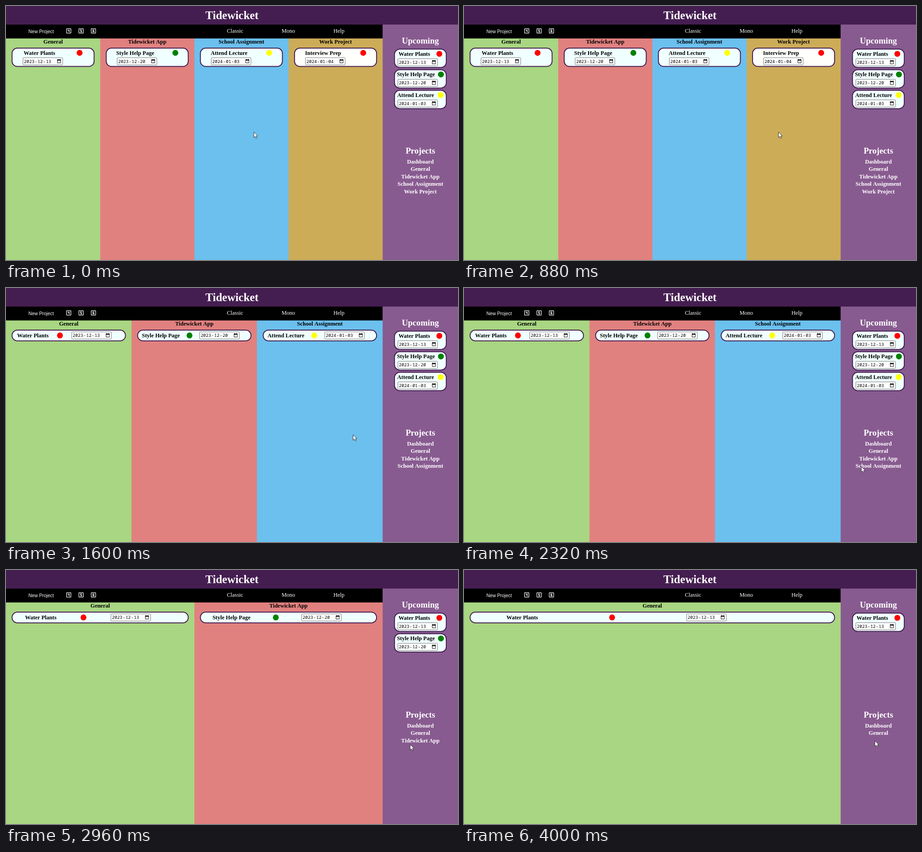
Recreate the animation shown at these times as an HTML page with a canvas. Size 998 by 561 pixels, loop 4080 ms.

```html
<!DOCTYPE html>
<html lang="en">
<head>
<meta charset="utf-8">
<title>Task board</title>
<style>
html, body { margin: 0; width: 100%; height: 100%; overflow: hidden; background: #000; }
canvas { display: block; width: 998px; height: 561px; }
</style>
</head>
<body>
<canvas id="stage" width="998" height="561"></canvas>
<script>
const ctx = document.getElementById('stage').getContext('2d');
const LOOP = 4080, STEP = 80;
const PURPLE = '#451e51';
const SERIF = '"Liberation Serif", "Times New Roman", serif';
const BOLD = 'bold 12.47px ' + SERIF;
const HEAD = 'bold 18.7px ' + SERIF;
const MONO = '9.53px "Noto Sans Mono", monospace';
const BAR_W = 831.6;
const DOT = 13, DATE_W = 88.5;

const projects = [
  { name: 'General', bg: '#a8d682', task: 'Water Plants', dot: '#ff0000', date: '2023-12-13' },
  { name: 'Tidewicket App', bg: '#e1817f', task: 'Style Help Page', dot: '#008000', date: '2023-12-20' },
  { name: 'School Assignment', bg: '#6bc0ee', task: 'Attend Lecture', dot: '#ffff00', date: '2024-01-03' },
  { name: 'Work Project', bg: '#cdac58', task: 'Interview Prep', dot: '#ff0000', date: '2024-01-04', fill: '#fffffc' }
];
const removals = [960, 2800, 3920];

// time, x, y of the pointer tip
const pointer = [
  [80, 547, 278], [800, 694, 278], [1120, 694, 278], [2240, 877, 394],
  [2320, 877, 394], [2640, 892, 389], [2800, 892, 389], [2960, 892, 385],
  [3600, 911, 377], [3840, 911, 377], [4000, 907, 377]
];
const handTimes = [[2400, 2800], [3360, 3920]];

const ARROW = new Path2D('M0 0V12.4L2.8 9.7L4.7 14L6.7 13.1L4.9 8.9H8.6Z');
const HAND = new Path2D('M-1.2 8V.9Q-1.2-.4 0-.4Q1.2-.4 1.2.9V5Q2.6 4.3 3.3 5.4Q4.7 4.8 5.2 6Q6.9 5.7 6.9 7.5V10.3Q6.9 12.3 5.6 13.4V15H-1.2V13.6L-4 9.2Q-4.6 7.9-3.5 7.5Q-2.6 7.2-1.2 9Z');
const DIGITS = {
  4: new Path2D('M10 7v5h4M14 7v10'),
  5: new Path2D('M15 8h-5v4h4v4h-5'),
  6: new Path2D('M15 8h-5v8h4v-4h-4')
};

function rect(x, y, w, h, color) {
  ctx.fillStyle = color;
  ctx.fillRect(x, y, w, h);
}

function text(str, x, y, font, color, align = 'left') {
  ctx.font = font;
  ctx.fillStyle = color;
  ctx.textAlign = align;
  ctx.fillText(str, x, y);
}

function dateField(x, cy, date) {
  ctx.beginPath();
  ctx.roundRect(x + .5, cy - 7.9, DATE_W - 1, 15.8, 1.3);
  ctx.fillStyle = '#fff';
  ctx.fill();
  ctx.strokeStyle = '#767676';
  ctx.lineWidth = 1;
  ctx.stroke();

  let tx = x + 2.1;
  date.split('-').forEach((part, i) => {
    if (i) {
      text('-', tx, cy + 3.4, MONO, '#000');
      tx += 5.72;
    }
    text(part, tx + .65, cy + 3.4, MONO, '#000');
    tx += part.length * 5.72 + 1.3;
  });

  const ix = x + 76;
  ctx.strokeStyle = '#111';
  ctx.strokeRect(ix + .5, cy - 3.5, 7, 7);
  rect(ix, cy - 4, 8, 2.4, '#111');
  rect(ix + 1, cy - 5, 1.2, 1.2, '#111');
  rect(ix + 5.8, cy - 5, 1.2, 1.2, '#111');
}

// Items share the free width evenly; narrow cards wrap the date to a second row.
function card(p, x, y, w, wrap) {
  const h = wrap ? 42.4 : 25.6;
  ctx.beginPath();
  ctx.roundRect(x + 1, y + 1, w - 2, h - 2, wrap ? 11.5 : 11.8);
  ctx.fillStyle = p.fill || '#f0ffff';
  ctx.fill();
  ctx.strokeStyle = PURPLE;
  ctx.lineWidth = 2;
  ctx.stroke();

  ctx.font = BOLD;
  const tw = ctx.measureText(p.task).width;
  const inner = w - 4, left = x + 2;
  const used = tw + DOT + (wrap ? 0 : DATE_W);
  const gap = (inner - used) / (wrap ? 4 : 8);
  const cy = y + (wrap ? 11.4 : 12.7);
  const dotX = left + gap * 3 + tw;

  text(p.task, left + gap + .5, cy + 4.1, BOLD, '#000');
  ctx.beginPath();
  ctx.arc(dotX + DOT / 2 - .4, cy, DOT / 2, 0, Math.PI * 2);
  ctx.fillStyle = p.dot;
  ctx.fill();

  if (wrap) dateField(left + (inner - DATE_W) / 4, y + 30, p.date);
  else dateField(dotX + DOT + gap * 2 - .7, cy, p.date);
}

function digitIcon(n, cx) {
  ctx.save();
  ctx.translate(cx, 55);
  ctx.scale(.61, .61);
  ctx.translate(-12, -12);
  ctx.strokeStyle = '#fff';
  ctx.lineWidth = 2;
  ctx.beginPath();
  ctx.roundRect(4, 4, 16, 16, 1.2);
  ctx.stroke();
  ctx.stroke(DIGITS[n]);
  ctx.restore();
}

function navBar() {
  rect(0, 41, BAR_W, 30.5, '#000');
  text('New Project', 49.5, 59.6, '10.4px "Liberation Sans", Arial, sans-serif', '#fff');
  [4, 5, 6].forEach((n, i) => digitIcon(n, 138.5 + i * 27.3));
  const font = '12.47px ' + SERIF;
  text('Classic', 505.8, 58.5, font, '#fff', 'center');
  text('Mono', 623.4, 58.5, font, '#fff', 'center');
  text('Help', 735, 58.5, font, '#fff', 'center');
}

function columns(list) {
  const w = BAR_W / list.length;
  list.forEach((p, i) => {
    const x = i * w, edge = Math.round(x);
    rect(edge, 71.5, Math.round(x + w) - edge, 490, p.bg);
    text(p.name, x + w / 2, 82.9, BOLD, '#000', 'center');
    card(p, x + 12.4, 92.1, w - 24.8, list.length > 3);
  });
}

function sidebar(list) {
  const cx = 914.9;
  rect(BAR_W, 41, 998 - BAR_W, 520, '#885b90');
  text('Upcoming', cx, 83.2, HEAD, '#fff', 'center');
  list.slice(0, 3).forEach((p, i) => card(p, 856.8, 94.3 + i * 45.5, 116.3, true));
  text('Projects', cx, 326, HEAD, '#fff', 'center');
  ['Dashboard', ...list.map(p => p.name)].forEach((name, i) =>
    text(name, cx, 347.5 + i * 16.5, BOLD, '#fff', 'center'));
}

function pointerAt(t) {
  if (t <= pointer[0][0]) return pointer[0].slice(1);
  const i = pointer.findIndex(k => k[0] >= t);
  if (i < 0) return pointer[pointer.length - 1].slice(1);
  const [t0, x0, y0] = pointer[i - 1], [t1, x1, y1] = pointer[i];
  const u = (t - t0) / (t1 - t0), e = u * u * (3 - 2 * u);
  return [x0 + (x1 - x0) * e, y0 + (y1 - y0) * e];
}

function cursor(t) {
  const [x, y] = pointerAt(t);
  const hand = handTimes.some(([a, b]) => t >= a && t <= b);
  const shape = hand ? HAND : ARROW;
  ctx.save();
  ctx.translate(x + .3, y + .3);
  ctx.fillStyle = '#fff';
  ctx.fill(shape);
  ctx.strokeStyle = '#222';
  ctx.lineWidth = .9;
  ctx.stroke(shape);
  if (hand) {
    ctx.beginPath();
    for (const fx of [1.2, 3.3, 5.2]) {
      ctx.moveTo(fx, 5.6);
      ctx.lineTo(fx, 8.2);
    }
    ctx.lineWidth = .6;
    ctx.stroke();
  }
  ctx.restore();
}

function draw(t) {
  const gone = removals.filter(r => t >= r).length;
  const list = projects.slice(0, projects.length - gone);
  columns(list);
  navBar();
  sidebar(list);
  rect(0, 0, 998, 41, PURPLE);
  text('Tidewicket', 499, 29, 'bold 24.95px ' + SERIF, '#fff', 'center');
  cursor(t);
}

const start = performance.now();
function tick() {
  const t = (performance.now() - start) % LOOP;
  draw(Math.floor(t / STEP) * STEP);
  requestAnimationFrame(tick);
}
tick();
</script>
</body>
</html>
```
